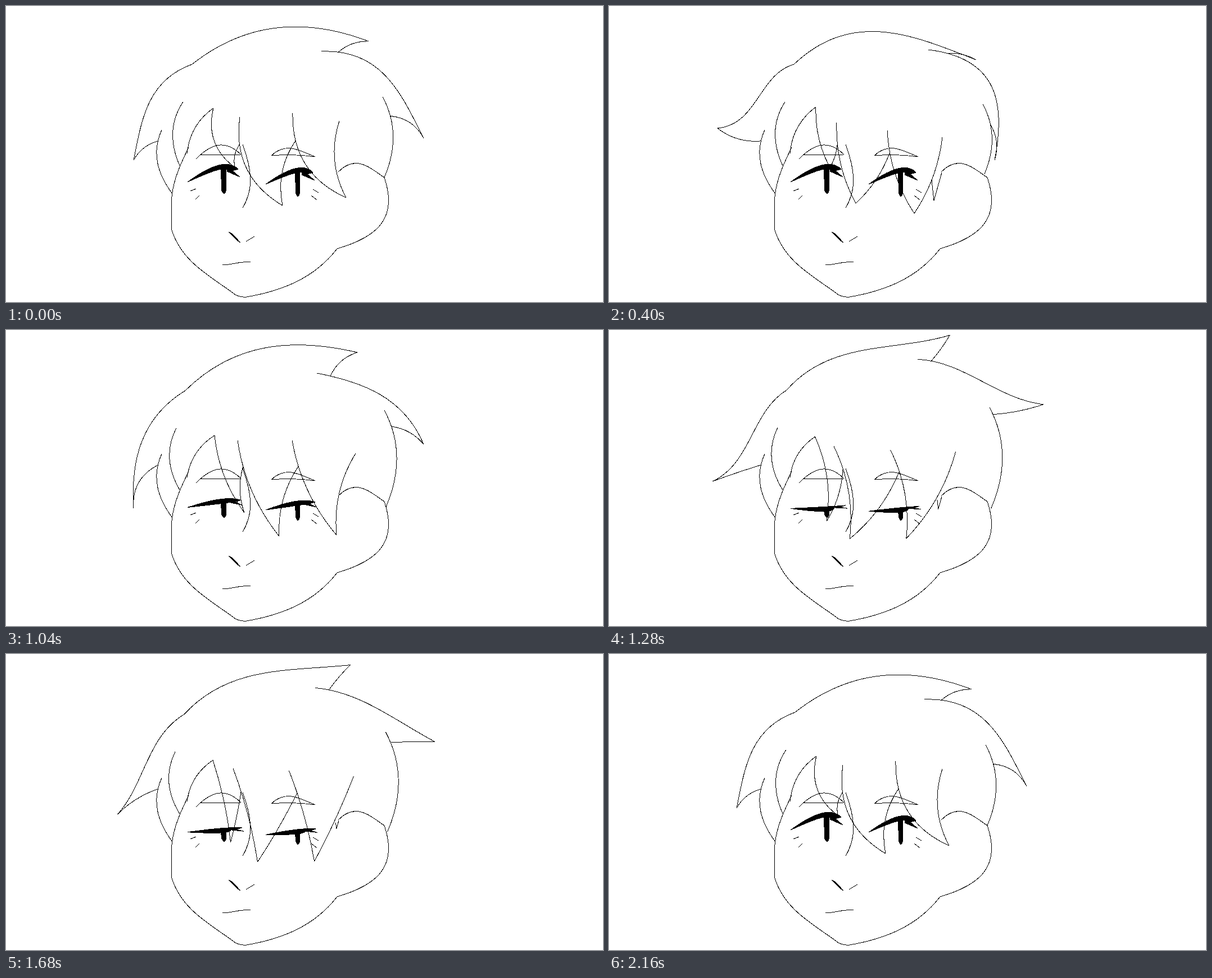
An HTML page that plays this animation: 1062 px wide and 528 px high, repeating every 2.24 s.

```html
<!DOCTYPE html>
<html lang="en">
<head>
<meta charset="utf-8">
<title>Hair in the wind</title>
<style>
  html, body { margin: 0; width: 100%; height: 100%; overflow: hidden; background: #fff; }
  svg { display: block; width: 100%; height: 100%; }
  path { fill: none; stroke: #000; stroke-width: 1; shape-rendering: crispEdges; }
  .ink { fill: #000; }
</style>
</head>
<body>
<svg viewBox="0 0 1062 528">
  <path id="face"/>
  <path id="hair"/>
  <path class="ink" d="M396 403L402 406L417 422L412 419Z"/>
  <path id="eyes" class="ink"/>
</svg>
<script>
const STEP = 80, STEPS = 28;
const el = id => document.getElementById(id);

// A stroke from a to b; b1 and b2 bow it sideways, relative to its length
function arc(a, b, b1 = 0, b2 = b1) {
  const dx = b[0] - a[0], dy = b[1] - a[1];
  const ctrl = (t, bow) => [a[0] + dx * t + dy * bow, a[1] + dy * t - dx * bow];
  return [a, ctrl(1 / 3, b1), ctrl(2 / 3, b2), b];
}

const mix = (a, b, k) => typeof a === 'number' ? a + (b - a) * k
  : Array.isArray(a) ? a.map((v, i) => mix(v, b[i], k))
  : Object.fromEntries(Object.keys(a).map(key => [key, mix(a[key], b[key], k)]));

function pointOn(curve, t) {
  while (curve.length > 1) curve = curve.slice(1).map((p, i) => mix(curve[i], p, t));
  return curve[0];
}

const trace = arcs => arcs.map(([a, ...rest]) => `M${a}C${rest.join(' ')}`).join('');

// x, y to x, y, then the two bows
const face = [
  [591, 296, 673, 306, .43, .17], [673, 306, 589, 433, .43, .28],   // ear
  [589, 433, 428, 519, .15, .11], [428, 519, 408, 515, .1, .1],     // jaw
  [408, 515, 295, 400, .05, .17], [295, 400, 295, 340, .02, .02],
  [295, 340, 325, 252, .08, .04],
  [338, 273, 418, 265, .28, .4], [345, 266, 418, 265, 0, 0],        // brows
  [472, 267, 550, 269, .34, .12], [472, 267, 550, 269, .04, .04],
  [421, 247, 421, 360, .12, .2],
  [328, 330, 338, 326, 0, 0], [337, 345, 344, 338, 0, 0],           // cheeks
  [546, 327, 556, 333, 0, 0], [543, 338, 553, 346, 0, 0],
  [427, 420, 442, 411, 0, 0], [385, 462, 435, 457, -.03, .08]       // nose, mouth
];
el('face').setAttribute('d', trace(face.map(([x, y, u, v, ...bows]) => arc([x, y], [u, v], ...bows))));

// Outer locks: tip, two bows of the outer edge, bow of the underside.
// Fringe: roots and tips from left to right, bows of right and left edges.
const poses = {
  calm: {
    notch: [331, 104], crown: [[645, 63], .2, .18, -.13], left: [[227, 275], -.27, -.12, .14],
    right: [[743, 236], .31, .14, -.18], top: [561, 81], back: [670, 162], hang: .24,
    roots: [[369, 182], [416, 198], [510, 191], [593, 205]],
    tips: [[407, 288], [492, 356], [605, 342]], bows: [-.22, .14], sideburn: 0, shut: 0
  },
  still: {
    notch: [329, 104], crown: [[653, 96], .3, .14, -.1], left: [[193, 218], -.15, .23, -.13],
    right: [[686, 275], .43, .3, -.15], top: [568, 78], back: [665, 175], hang: .3,
    roots: [[368, 180], [405, 208], [495, 222], [593, 234]],
    tips: [[393, 288], [439, 352], [543, 370]], bows: [-.09, -.08], sideburn: 1, shut: 0
  },
  breeze: {
    notch: [319, 108], crown: [[625, 40], .21, .16, -.15], left: [[227, 318], -.23, -.17, .22],
    right: [[743, 204], .14, .22, -.13], top: [553, 77], back: [673, 143], hang: .17,
    roots: [[371, 188], [412, 197], [509, 197], [622, 220]],
    tips: [[424, 326], [486, 368], [588, 366]], bows: [-.09, .11], sideburn: 0, shut: .5
  },
  gust: {
    notch: [315, 107], crown: [[600, -1], .19, -.04, .09], left: [[170, 254], -.08, .27, -.06],
    right: [[783, 109], .09, -.18, .1], top: [548, 44], back: [678, 136], hang: .04,
    roots: [[365, 191], [396, 211], [498, 220], [615, 216]],
    tips: [[375, 346], [409, 374], [509, 374]], bows: [.16, -.15], sideburn: .6, shut: 1
  }
};

const lock = (root, [tip, b1, b2, under], base) => [arc(root, tip, b1, b2), arc(tip, base, under)];

function rightArcs({ top, right, back, hang }) {
  const nape = arc(back, [back[0] + 3, 387 - back[1] / 2], .17, .15);
  return [nape, ...lock(top, right, pointOn(nape, hang))];
}

function leftArcs({ notch, left }) {
  const side = arc([277, 221], [296, 335], -.22, -.17);
  const inner = arc([notch[0] - 16, notch[1] + 67], [310, 287], -.2, -.17);
  return [side, inner, ...lock(notch, left, pointOn(side, .16))];
}

function fringeArcs({ roots, tips, bows: [rightBow, leftBow], sideburn }) {
  const edges = tips.map((tip, i) => arc(roots[i], tip, rightBow));
  const joins = [...edges.slice(1).map(e => pointOn(e, .25)), roots[3]];
  const ear = [592, 297], burn = mix(ear, [578, 347], sideburn);
  return [
    arc(roots[0], [322, 263], -.15), ...edges,
    ...tips.map((tip, i) => arc(tip, joins[i], leftBow)),
    arc(mix(ear, [574, 311], sideburn), burn), arc(burn, ear)
  ];
}

function hairArcs(pose, flick) {
  const right = rightArcs(flick);
  const crown = lock(pose.notch, pose.crown, pointOn(right[1], .1));
  return [...crown, ...right, ...leftArcs(pose), ...fringeArcs(pose)];
}

// Lid from corner over mid to end, with a small flick, and a bar below it
function eye(corner, [mx, my], [ex, ey], [x0, x1, foot], shut) {
  const [cx, cy] = corner;
  const bend = (y, x) => [2 * mx - (cx + x) / 2, 2 * y - (cy + ey) / 2];
  const lid = `M${corner}Q${bend(my, ex)} ${ex},${ey}L${ex - 10},${ey + 3}` +
    `L${ex + 3},${ey + 14 - 10 * shut}L${ex - 20},${ey + 4}Q${bend(my + 7, ex - 20)} ${corner}Z`;
  const bar = `M${x0},${my + 4}H${x1}L${x1 - 1},${foot - 3}L${x1 - 3},${foot}H${x1 - 5}L${x0 + 2},${foot - 4}Z`;
  return lid + bar;
}

function eyesPath(shut) {
  const at = (x, y, dx, dy) => [x + dx * shut, y + dy * shut];
  return eye(at(323, 314, 0, 5), at(378, 284, 4, 36), at(413, 291, 9, 25), [382, 392, 334], shut) +
    eye(at(462, 318, 0, 6), at(514, 290, 2, 31), at(546, 297, 7, 20), [514, 523, 339], shut);
}

// Keys: step, pose, pose leaned towards, amount
const sway = [[0, 'calm'], [4, 'calm', 'still', 1.2], [5, 'still'], [9, 'calm'], [13, 'breeze'],
  [17, 'gust'], [18, 'breeze', 'gust', 1.2], [19, 'gust'], [23, 'breeze'], [27, 'calm']];
const whip = [...sway, [11, 'calm', 'gust', 1.2], [25, 'calm', 'gust', 1.2]]
  .sort((a, b) => a[0] - b[0]);

const keyPose = ([, from, to = from, k = 0]) => mix(poses[from], poses[to], k);

function poseAt(track, step) {
  const next = Math.max(1, track.findIndex(key => key[0] >= step));
  const a = track[next - 1], b = track[next];
  return mix(keyPose(a), keyPose(b), (step - a[0]) / (b[0] - a[0]));
}

function render(ms) {
  const step = Math.floor(ms / STEP) % STEPS;
  const pose = poseAt(sway, step);
  el('hair').setAttribute('d', trace(hairArcs(pose, poseAt(whip, step))));
  el('eyes').setAttribute('d', eyesPath(Math.min(1, pose.shut)));
}

const start = performance.now();
function tick() {
  render(performance.now() - start);
  requestAnimationFrame(tick);
}
tick();
</script>
</body>
</html>
```
